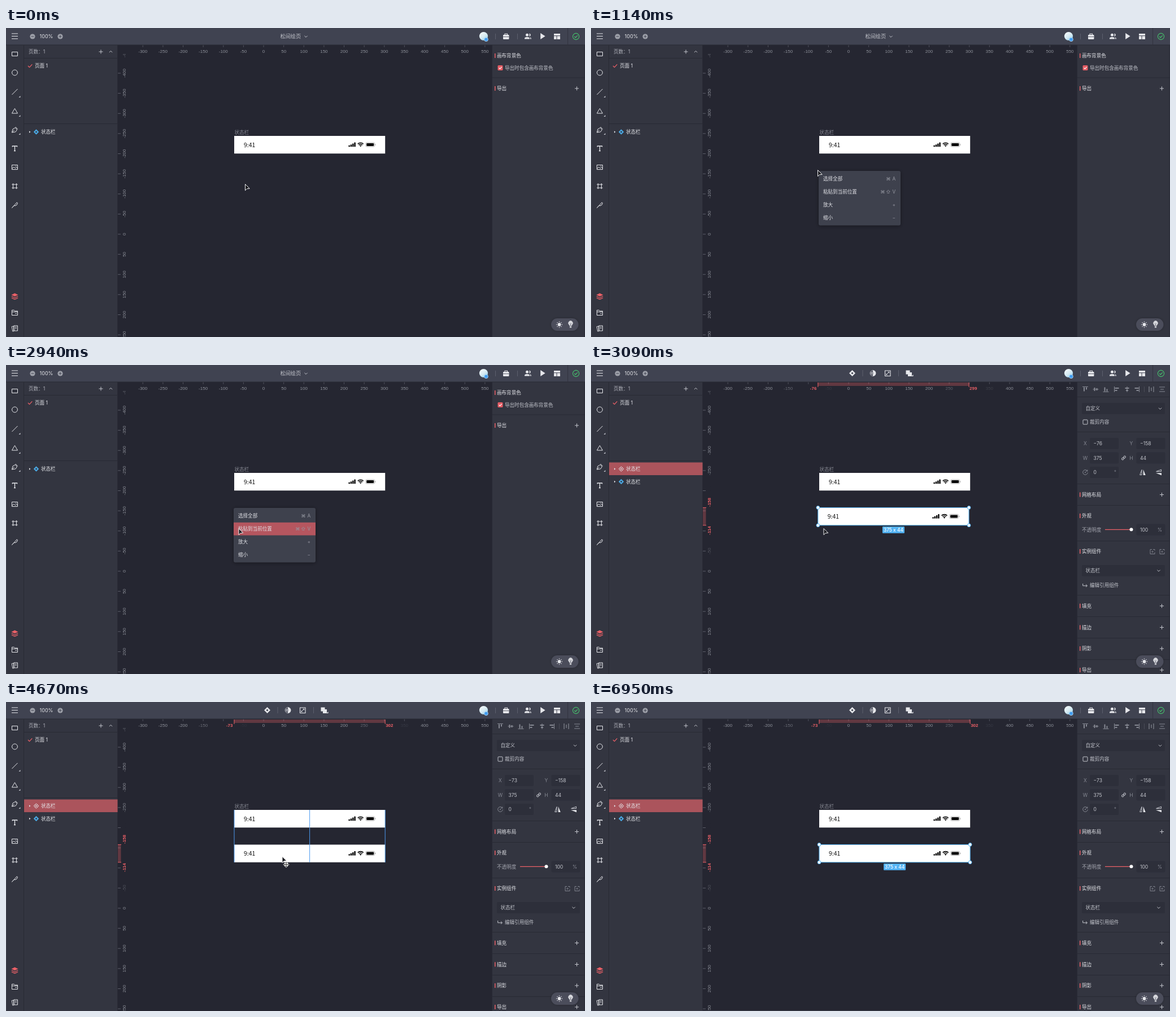
These frames come from a looping animation (1025x547 px, 7050 ms). An HTML page with a canvas:

```html
<!DOCTYPE html>
<html lang="zh-CN">
<head>
<meta charset="utf-8">
<title>状态栏</title>
<style>
html, body { margin: 0; width: 100%; height: 100%; overflow: hidden; background: #252631; }
canvas { display: block; width: 1025px; height: 547px; }
</style>
</head>
<body>
<canvas id="stage"></canvas>
<script>
const W = 1025, H = 547, LOOP = 7050;
const canvas = document.getElementById('stage');
const dpr = window.devicePixelRatio || 1;
canvas.width = W * dpr;
canvas.height = H * dpr;
const c = canvas.getContext('2d');

const UI = 'Inter, "Noto Sans CJK SC", "Noto Sans CJK", sans-serif';
const RULER = '"Liberation Sans", sans-serif';
const CJK = '"Noto Sans CJK SC", "Noto Sans", sans-serif';
const BG = '#252631', PANEL = '#333540', BAR = '#404351', EDGE = '#282a34', FIELD = '#2d2f3a';
const LIGHT = '#e6e7eb', MID = '#c3c5cc', DIM = '#868993', RED = '#ea6067', BLUE = '#52b3f4';

// Drawing helpers
function rect(x, y, w, h, fill, r = 0) {
  c.fillStyle = fill;
  c.beginPath();
  r ? c.roundRect(x, y, w, h, r) : c.rect(x, y, w, h);
  c.fill();
}
function frame(x, y, w, h, color, lw = 1, r = 0) {
  c.strokeStyle = color;
  c.lineWidth = lw;
  c.beginPath();
  c.roundRect(x, y, w, h, r);
  c.stroke();
}
function dot(x, y, r, fill, stroke, lw = 1) {
  c.beginPath();
  c.arc(x, y, r, 0, Math.PI * 2);
  if (fill) { c.fillStyle = fill; c.fill(); }
  if (stroke) { c.strokeStyle = stroke; c.lineWidth = lw; c.stroke(); }
}
// Path in local coordinates around (x, y)
function icon(x, y, d, stroke, fill, lw = 1) {
  const p = new Path2D(d);
  c.save();
  c.translate(x, y);
  c.lineJoin = 'round';
  if (fill) { c.fillStyle = fill; c.fill(p); }
  if (stroke) { c.strokeStyle = stroke; c.lineWidth = lw; c.stroke(p); }
  c.restore();
}
function text(s, x, y, color = LIGHT, size = 8.55, align = 'left', font = UI, weight = 400) {
  c.font = `${weight} ${size}px ${font}`;
  c.fillStyle = color;
  c.textAlign = align;
  c.fillText(s, x, y + size * 0.365);
}
const plus = (x, y, color = MID) => icon(x, y, 'M-3.5 0H3.5M0-3.5V3.5', color);
const chevron = (x, y, color = MID) => icon(x, y, 'M-2.6-1.2L0 1.4L2.6-1.2', color);
const hline = (x, y, w) => rect(x, y, w, 1, EDGE);

// Canvas units to screen
const K = 0.7125;
const sx = u => 456 + u * K;
const sy = u => 365 + u * K;

function topBar(selected) {
  rect(0, 0, W, 30, BAR);
  hline(0, 29.5, W);
  icon(15.5, 14.5, 'M-5.5-4.5H5.5M-5.5 0H5.5M-5.5 4.5H5.5', LIGHT);
  for (const x of [47, 96]) {
    dot(x, 15, 4.6, '#9da0a9');
    icon(x, 15, x < 50 ? 'M-2.4 0H2.4' : 'M-2.4 0H2.4M0-2.4V2.4', BAR);
  }
  text('100%', 71.5, 15, LIGHT, 9, 'center');
  if (selected) {
    icon(462.5, 14.5, 'M0-5.5L5.5 0L0 5.5L-5.5 0ZM0-2L-2 0L0 2L2 0Z', null, LIGHT);
    dot(499, 14.5, 5, null, '#a7a9b2');
    icon(499, 14.5, 'M0-5.3A5.3 5.3 0 0 1 0 5.3Z', null, LIGHT);
    dot(497.2, 14.5, 2.7, '#90929c');
    frame(520.5, 10, 9.5, 9.5, LIGHT, 1.1);
    icon(525.2, 14.7, 'M0.3-3H3V-0.3ZM-3 0.3V3H-0.3Z', null, LIGHT);
    icon(525.2, 14.7, 'M-2 2L2-2', LIGHT);
    rect(557.5, 9.5, 7, 7, LIGHT);
    rect(561, 13, 7, 7, LIGHT);
    icon(569.5, 19, 'M1-2V1H-2Z', null, LIGHT);
    for (const x of [480.5, 544]) rect(x, 9, 1, 11, '#5d606d');
  } else {
    text('松间绘页', 485.5, 14.5, MID, 9.2);
    chevron(531, 15);
  }
  const g = c.createLinearGradient(840, 8, 850, 22);
  g.addColorStop(0, '#f3f9fb');
  g.addColorStop(0.55, '#d5eaf2');
  g.addColorStop(1, '#8fcbe8');
  dot(845.5, 14.5, 7.6, g);
  dot(850, 20.3, 3.4, '#3f9cf0', '#cfe8f8', 0.7);
  rect(866, 10, 1, 10, '#5d606d');
  rect(905, 10, 1, 10, '#5d606d');
  rect(880, 12, 10.5, 8, LIGHT, 1);
  frame(883, 10.3, 4.5, 2.5, LIGHT, 1.1);
  icon(885.2, 15.5, 'M-5 0H-1.2M1.2 0H5M-1 0H1', BAR, null, 0.8);
  dot(922.5, 12.3, 2.5, LIGHT);
  icon(922.5, 17.5, 'M-4.5 2V0.8C-4.5-2.4 4.5-2.4 4.5 0.8V2Z', null, LIGHT);
  icon(926.5, 12.3, 'M-0.3-2.5A2.5 2.5 0 0 1-0.3 2.5Q1.2 0-0.3-2.5M1 3.6Q3.4 4.4 3.4 7.2H1.6Q1.8 5 1 3.6', null, LIGHT);
  icon(950, 14.5, 'M-3.8-5.5L4.6 0L-3.8 5.5Z', null, LIGHT);
  rect(970, 10, 11, 3.3, LIGHT);
  rect(970, 14.3, 4.5, 5.7, LIGHT);
  rect(975.5, 14.3, 5.5, 5.7, LIGHT);
  rect(994, 0, 1, 30, '#31333e');
  dot(1009, 15, 5.6, null, '#45c36c', 1.1);
  icon(1009, 15, 'M-2.8 0L-0.8 2L2.9-1.8', '#45c36c', null, 1.1);
}

function toolBar() {
  rect(0, 30, 31, H, PANEL);
  rect(0, 30, 1, H, '#41434e');
  rect(31, 30, 1, H, EDGE);
  const I = (y, d, lw = 1) => icon(15.5, y, d, LIGHT, null, lw);
  I(46, 'M-5-3.5H5V3.5H-5Z');
  dot(15.5, 79, 4.9, null, LIGHT);
  I(113, 'M-5 5L5-5');
  I(147, 'M0-4.5L5 4H-5Z');
  I(180, 'M-5 5L-3.5-1L1-3.5L4 0L1.5 3.8ZM-5 5L-0.8 0.7M1.2-5L5.2-0.8');
  I(213, 'M-4.2-2.5V-4H4.2V-2.5M0-4V4.5M-1.5 4.5H1.5', 1.3);
  I(246.5, 'M-5-4H5V4H-5ZM-5 2.5L-1.5-0.5L1 2L3 0L5 2');
  dot(17.6, 244.7, 0.8, LIGHT);
  I(280, 'M-3-5V5M3-5V5M-5.2-3H5.2M-5.2 3H5.2');
  I(313.5, 'M-5 5L3.8-4.8L5-3.5Q4.5 0.5 0.5 1.2L-1.3 1Z');
  for (const y of [122, 156, 188]) icon(24.5, y, 'M1-2V1H-2Z', null, MID);
  icon(15.5, 475, 'M0-5.5L6-2.6L0 0.3L-6-2.6Z', null, RED);
  icon(15.5, 475, 'M-5.7 0L0 2.8L5.7 0M-5.7 2.7L0 5.4L5.7 2.7', RED, null, 1.2);
  I(504, 'M-5 4.5V-4.5H-1.2L0-3H5V4.5ZM-5-1.5H5M1 1.5H3.3');
  I(532, 'M-5.2-3.5L-1.7-4.2V4.7L-3.7 5ZM-1.5-5H5V4H-1.5ZM0.5-2.5H3.3M0.5 0H3.3');
}

function layer(y, copy) {
  icon(42, y, 'M-1-1.8L1.5 0L-1 1.8Z', null, LIGHT);
  if (copy) {
    icon(53.5, y, 'M0-4.2L4.2 0L0 4.2L-4.2 0ZM-2.1-2.1L2.1 2.1M2.1-2.1L-2.1 2.1', LIGHT);
  } else {
    icon(53.5, y, 'M0-4.7L4.7 0L0 4.7L-4.7 0ZM0-1.7L-1.7 0L0 1.7L1.7 0Z', null, '#4aa8e2');
  }
  text('状态栏', 62, y);
}

function leftPanel(selected) {
  rect(32, 30, 165, H, PANEL);
  rect(197, 30, 1, H, EDGE);
  text('页数：1', 40, 42, '#b1b3bb');
  plus(168, 42);
  icon(185.5, 42, 'M-2.6 1.2L0-1.4L2.6 1.2', MID);
  hline(32, 53, 165);
  icon(42.5, 67, 'M-3.5 0L-1 2.6L3.8-2.6', RED, null, 1.3);
  text('页面 1', 51, 67);
  hline(32, 169, 165);
  if (selected) {
    rect(32, 172.5, 165.5, 22.5, '#ab545c');
    layer(184, true);
    layer(206.5, false);
  } else layer(184, false);
}

function rulers(sel) {
  const ends = sel === null ? [] : [sx(sel) - 8, sx(sel + 375) + 7];
  const sides = sel === null ? [] : [243, 293];
  const fade = (p, marks) => Math.max(0, Math.min(1, ...marks.map(m => (Math.abs(p - m) - 20) / 40)));
  c.save();
  c.beginPath();
  c.rect(198, 30, 663, 517);
  c.clip();
  for (let u = -300; u <= 550; u += 50) {
    const x = sx(u);
    rect(x - 0.5, 30, 1, 4, '#50525e');
    c.globalAlpha = fade(x, ends);
    text(u, x, 41, '#8d9099', 8, 'center', RULER);
    c.globalAlpha = 1;
  }
  c.beginPath();
  c.rect(198, 46, 20, 501);
  c.clip();
  const upright = (s, y, color, weight) => {
    c.save();
    c.translate(209, y);
    c.rotate(-Math.PI / 2);
    text(s, 0, 0, color, 8, 'center', RULER, weight);
    c.restore();
  };
  for (let u = -450; u <= 250; u += 50) {
    const y = sy(u);
    rect(198, y - 0.5, 5, 1, '#5b5d68');
    c.globalAlpha = fade(y, sides) * (u < -400 ? 0.5 : 1);
    upright(u, y, '#8d9099');
    c.globalAlpha = 1;
  }
  if (sel !== null) {
    const top = sy(-158), bottom = sy(-114);
    rect(198, top, 5.5, bottom - top, 'rgba(234,96,103,.3)');
    rect(198, top - 0.5, 6, 1, RED);
    rect(198, bottom - 0.5, 6, 1, RED);
    upright('-158', 243, RED, 700);
    upright('-114', 293, RED, 700);
  }
  c.restore();
  if (sel !== null) {
    const a = sx(sel), b = sx(sel + 375);
    rect(a, 31, b - a, 6, 'rgba(234,96,103,.3)');
    rect(a - 0.5, 31, 1, 8, RED);
    rect(b - 0.5, 31, 1, 8, RED);
    text(sel, a - 2.5, 41, RED, 8, 'right', RULER, 700);
    text(sel + 375, b + 1, 41, RED, 8, 'left', RULER, 700);
  }
}

function statusBar(x, y) {
  rect(x, y, 267.2, 31.3, '#fff');
  text('9:41', x + 17, y + 16, '#111', 10.4, 'left', CJK);
  [2.6, 4, 5.8, 7.8].forEach((h, i) => rect(x + 202.5 + i * 3.3, y + 19.3 - h, 2.4, h, '#000', 0.6));
  const wx = x + 223.7, wy = y + 19.2;
  c.strokeStyle = '#000';
  c.lineWidth = 1.6;
  for (const r of [7, 4.4]) {
    c.beginPath();
    c.arc(wx, wy, r, -Math.PI * 0.75, -Math.PI * 0.25);
    c.stroke();
  }
  icon(wx, wy, 'M0 0L-1.8-1.9A2.6 2.6 0 0 1 1.8-1.9Z', null, '#000');
  frame(x + 232.8, y + 11.8, 15.8, 7.4, '#a5a5a5', 0.8, 2);
  rect(x + 234.2, y + 13, 13, 5, '#000', 1);
  rect(x + 249.3, y + 14.2, 1, 2.6, '#a5a5a5', 0.5);
}

function copyBar(s) {
  const x = sx(s.sel), y = sy(-158), w = 375 * K, h = 44 * K;
  statusBar(x, y);
  if (s.snap) {
    for (const gx of [x, x + w / 2, x + w]) rect(gx - 0.5, 191, 1, y + h - 191, '#4d9bf0');
  }
  if (s.handles) {
    frame(x, y, w, h, BLUE);
    for (const hx of [x, x + w]) for (const hy of [y, y + h]) dot(hx, hy, 2.9, '#fff', BLUE);
    rect(x + w / 2 - 19.5, 286, 39, 11.7, BLUE, 1);
    text('375 x 44', x + w / 2, 292, '#fff', 8.4, 'center', UI, 500);
  }
}

function section(name, y, add = true) {
  rect(865, y - 4, 1.5, 8, RED);
  text(name, 869, y, LIGHT, 8.55, 'left', UI, 500);
  if (add) plus(1010.5, y);
}
function field(x, y, w, value) {
  rect(x, y - 10, w, 20, FIELD, 2);
  text(value, x + 6.5, y, MID);
}

function aligners() {
  // Each one: a guide line and two blocks
  [875, 893.5, 911.5].forEach((x, i) => {
    const gy = [38.5, 43, 47.5][i], off = [1, -3, -8][i];
    rect(x - 5, gy - 0.5, 10, 1, DIM);
    rect(x - 3, gy + off, 2, i === 1 ? 6 : 7, DIM);
    rect(x + 1, gy + off + (i === 2 ? 3 : i), 2, 4, DIM);
  });
  [931, 949, 966].forEach((x, i) => {
    const gx = x + [-4.5, 0, 4.5][i], off = [1, -3.5, -8][i];
    rect(gx - 0.5, 38, 1, 10, DIM);
    rect(gx + off, 40, 7, 2, DIM);
    rect(gx + off + [0, 1.5, 3][i], 44, 4, 2, DIM);
  });
  rect(979, 38, 1, 10, '#4a4c57');
  icon(992, 43, 'M-4-5V5M4-5V5M0-3V3', DIM, null, 1.2);
  icon(1011, 43, 'M-5-4H5M-5 4H5M-3 0H3', DIM, null, 1.2);
}

function rightPanel(sel) {
  rect(861, 30, 164, H, PANEL);
  rect(860, 30, 1, H, EDGE);
  if (sel === null) {
    section('画布背景色', 49, false);
    rect(870.5, 66, 9, 9, '#e45c64', 1.5);
    icon(875, 70.5, 'M-2.4 0L-0.6 1.8L2.6-1.7', '#fff', null, 1.1);
    text('导出时包含画布背景色', 883, 70.5, MID);
    hline(861, 87.5, 164);
    section('导出', 107);
  } else {
    aligners();
    for (const y of [56, 118, 210, 248, 311, 407, 445, 483, 521]) hline(861, y, 164);
    field(869, 77, 147, '自定义');
    chevron(1007.5, 77);
    frame(871, 97, 8, 8, MID, 1, 1);
    text('裁剪内容', 883, 101, MID);
    const cells = [['X', String(sel), 'Y', '-158', 139], ['W', '375', 'H', '44', 164.5]];
    for (const [a, va, b, vb, y] of cells) {
      text(a, 875, y, DIM, 8.5, 'center');
      field(883, y, 51, va.replace('-', '−'));
      text(b, 956.5, y, DIM, 8.5, 'center');
      field(965.5, y, 51, vb.replace('-', '−'));
    }
    c.save();
    c.translate(943, 164.5);
    c.rotate(-Math.PI / 4);
    frame(-4.2, -1.6, 4, 3.2, MID, 1, 1.6);
    frame(0.2, -1.6, 4, 3.2, MID, 1, 1.6);
    c.restore();
    icon(875, 190, 'M3.4-2.7A4.3 4.3 0 1 0 4.3 0.5M3.8-4.5V-2H1.3', DIM);
    dot(875, 190, 1, DIM);
    field(883, 190, 51, '0');
    text('°', 928, 190, DIM, 8.5, 'center');
    icon(976.5, 190, 'M-1.5-4.5V4.5H-4.8Z', MID);
    icon(976.5, 190, 'M1.2-5V5H5.2Z', null, LIGHT);
    icon(1005, 190, 'M-5 1.2H5V5.2Z', null, LIGHT);
    icon(1005, 190, 'M-4.5-1.5H4.5V-4.8Z', MID);
    section('网格布局', 229.5);
    section('外观', 267, false);
    text('不透明度', 869, 291.5, '#a2a4ad');
    rect(910, 290.7, 47, 1.3, RED);
    dot(956.5, 291.3, 3, '#fff');
    field(965.5, 291.5, 51, '100');
    text('%', 1007, 291.5, DIM, 8.5, 'center');
    section('实例组件', 330, false);
    for (const x of [994, 1011]) {
      icon(x, 330.5, 'M-1-4H-4V4H4V1M1-4H4V-2M0 2V-1M-1.5 0.2L0-1.3L1.5 0.2', DIM, null, 0.9);
    }
    field(869, 364, 147, '状态栏');
    chevron(1005, 364);
    icon(874.5, 390, 'M-3.8-3V0.8H3.8M1.5-1.5L3.9 0.8L1.5 3.1', MID);
    text('编辑引用组件', 883, 390, MID);
    section('填充', 426.5);
    section('描边', 464.5);
    section('阴影', 502);
    section('导出', 540);
  }
  rect(1023.5, 30, 1, H, EDGE);
}

function themeSwitch() {
  c.save();
  c.shadowColor = 'rgba(0,0,0,.25)';
  c.shadowBlur = 4;
  rect(965, 514, 48.5, 22, '#4b4d5b', 11);
  c.restore();
  dot(979.5, 525, 2.9, LIGHT);
  for (let i = 0; i < 8; i++) {
    const a = i * Math.PI / 4;
    dot(979.5 + Math.cos(a) * 4.9, 525 + Math.sin(a) * 4.9, 0.75, LIGHT);
  }
  icon(999.5, 525, 'M-1.8 2.5Q-1.8 1.5-3 0.2A4.1 4.1 0 1 1 3 0.2Q1.8 1.5 1.8 2.5ZM-1.6 3.3H1.6V5.5H-1.6Z', null, '#d6d7dc');
  icon(999.5, 525, 'M-1.5-2L0-0.5L1.5-2M0-0.5V2', '#4b4d5b', null, 0.7);
}

function menu(hover) {
  c.save();
  c.shadowColor = 'rgba(0,0,0,.4)';
  c.shadowBlur = 6;
  c.shadowOffsetY = 1;
  rect(403, 253, 145, 96.5, '#3e414d', 3);
  c.restore();
  const rows = [['选择全部', '⌘A'], ['粘贴到当前位置', '⌘⇧V'], ['放大', '+'], ['缩小', '−']];
  rows.forEach(([name, keys], i) => {
    const y = 267.3 + i * 22.8;
    if (hover[i]) rect(403, y - 11.4, 145, 22.8, `rgba(181,86,95,${hover[i]})`);
    text(name, 411, y, '#e0e1e6');
    [...keys].reverse().forEach((k, j) =>
      text(k, 536.3 - j * 10, y, '#9698a2', 8.3, 'center', 'Inter, "DejaVu Sans", sans-serif'));
  });
}

const ARROW = 'M0.5 0.5V11.6L3.6 8.6L8.2 8.2Z';
function cursor(kind, x, y) {
  if (kind === 'hand') {
    icon(x, y, 'M3 1.2Q4.2 0.2 5 1.4V4.6Q6.4 4 6.8 5Q8 4.6 8.4 5.6Q9.6 5.6 9.7 6.8L9.4 9.5L8.6 12H4.2L1 8.2Q0.6 6.6 2 6.8L3 7.6Z', '#111', '#fff', 0.9);
    return;
  }
  icon(x, y, ARROW, '#fff', '#15161c', 0.95);
  if (kind === 'move') {
    icon(x + 7.5, y + 14.8, 'M0-5.5L5.5 0L0 5.5L-5.5 0Z', null, '#fff');
    icon(x + 7.5, y + 14.8, 'M-4 0H4M0-4V4M-1.2-2.9L0-4.2L1.2-2.9M-1.2 2.9L0 4.2L1.2 2.9M-2.9-1.2L-4.2 0L-2.9 1.2M2.9-1.2L4.2 0L2.9 1.2', '#111', null, 0.9);
  }
}

// Pointer: start time, kind, x, y
const POINTER = [
  [0, 'arrow', 423, 276], [150, 'arrow', 420, 272], [300, 'arrow', 411, 262], [540, 'arrow', 403, 254],
  [690, 'arrow', 401, 251], [1590, 'arrow', 402, 255], [1740, 'hand', 406, 264], [1890, 'hand', 410, 276],
  [2040, 'hand', 411.5, 288], [2940, 'arrow', 411.5, 289], [3690, 'arrow', 448, 281], [3930, 'arrow', 483, 274],
  [4230, 'move', 483.5, 274], [4380, 'move', 485, 273.5], [4520, 'move', 487, 273], [4670, 'move', 488.5, 273],
  [5270, 'arrow', 496, 278], [5420, 'arrow', 590, 345], [5570, 'arrow', 728, 432], [5720, 'arrow', 800, 467],
  [6010, 'arrow', 838, 487], [6160, 'arrow', 912, 523], [6310, 'none', 0, 0]
];
// Menu row highlights: start time, first row, second row
const HOVER = [[0, 0, 0], [1740, 0.6, 0], [1890, 1, 0], [2040, 0.24, 0.72], [2190, 0, 1]];
const at = (keys, t) => keys.findLast(k => k[0] <= t);

function draw(t) {
  const pasted = t >= 3090;
  const dragging = t >= 4230 && t < 5270;
  const sel = !pasted ? null : t < 4380 ? -76 : t < 4520 ? -75 : -73;
  c.setTransform(dpr, 0, 0, dpr, 0, 0);
  rect(0, 0, W, H, BG);
  rulers(sel);
  text('状态栏', 404.5, 185, '#858791');
  statusBar(404, 191);
  if (pasted) copyBar({ sel, handles: !dragging, snap: dragging && t >= 4520 });
  toolBar();
  leftPanel(pasted);
  rightPanel(sel);
  topBar(pasted);
  themeSwitch();
  if (t >= 1140 && !pasted) menu(at(HOVER, t).slice(1));
  const [, kind, x, y] = at(POINTER, t);
  if (kind !== 'none') cursor(kind, x, y);
  if (t >= 6950) rect(0, 546, W, 1, '#3a3d49');
}

const start = performance.now();
function tick() {
  draw((performance.now() - start) % LOOP);
  requestAnimationFrame(tick);
}
tick();
</script>
</body>
</html>
```
